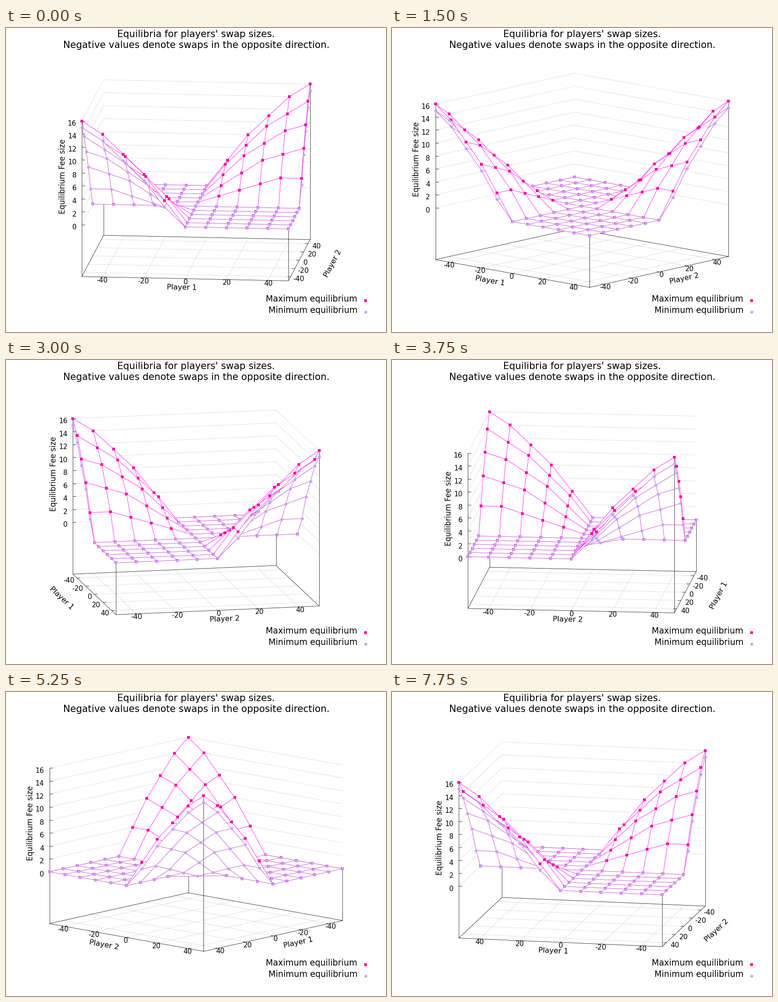
A matplotlib script for the animation above (8000 ms loop, 837x669 px).

```python
import numpy as np
import matplotlib.pyplot as plt
from matplotlib.animation import FuncAnimation
from matplotlib.collections import LineCollection

W, H, DPI = 837, 669, 64
PX = 72 / DPI                      # points per pixel
FRAMES, INTERVAL = 32, 250
START, STEP = 6, 6                 # view angle in degrees
CX, CY = 418.5, 506.3              # centre of the base plane
RADIUS, SQUASH, ZUNIT = 228.7, 0.1995, 14.26
Z_FLOOR, Z_TOP, LIM, N = -8, 16, 50, 11
TICKS = [-40, -20, 0, 20, 40]
Z_TICKS = list(range(0, 17, 2))
HOT, SOFT = "#ff00a0", "#c8a0ff"

plt.rcParams["font.family"] = "DejaVu Sans"

# Fee sizes where both swaps go the same way; zero elsewhere
FEES = np.array([[1, 2, 3, 4, 4],
                 [2, 4, 6, 7, 8],
                 [3, 6, 8, 10, 11],
                 [4, 7, 10, 12, 14],
                 [4, 8, 11, 14, 16]])
upper = np.zeros((N, N))
upper[6:, 6:] = FEES
upper[:5, :5] = FEES[::-1, ::-1]
lower = np.maximum(upper - 1, 0)

axis = np.linspace(-LIM, LIM, N)
gx, gy = np.meshgrid(axis, axis, indexing="ij")
verts = np.concatenate([np.stack([gx, gy, s], -1).reshape(-1, 3)
                        for s in (upper, lower)])
ids = np.arange(N * N).reshape(N, N)
qa, qb = ids[:-1, :-1].ravel(), ids[1:, :-1].ravel()
qc, qd = ids[:-1, 1:].ravel(), ids[1:, 1:].ravel()
tri_near, tri_far = np.stack([qa, qb, qc], 1), np.stack([qd, qc, qb], 1)
one = np.concatenate([tri_near, tri_far])
triangles = np.concatenate([one, one + N * N])
edges = np.concatenate([np.stack([ids[:-1].ravel(), ids[1:].ravel()], 1),
                        np.stack([ids[:, :-1].ravel(), ids[:, 1:].ravel()], 1)])
# Where the surfaces coincide, only the lower one draws its edges
raised = edges[(upper.ravel()[edges] > 0).any(1)]


def project(p, deg):
    """Screen x, screen y and nearness to the viewer."""
    p = np.asarray(p, float)
    c, s = np.cos(np.radians(deg)), np.sin(np.radians(deg))
    x, y, z = p[..., 0] / LIM, p[..., 1] / LIM, p[..., 2]
    near = x * s - y * c
    return np.stack([CX + RADIUS * (x * c + y * s),
                     CY + RADIUS * SQUASH * near - ZUNIT * (z - Z_FLOOR),
                     near], -1)


def visible(pts, tris, tol=1e-6, gap=1e-3):
    order = np.argsort(pts[:, 0])
    x, y, near = pts[order].T
    ok = np.ones(len(x), bool)
    first = np.searchsorted(x, tris[:, :, 0].min(1))
    last = np.searchsorted(x, tris[:, :, 0].max(1), "right")
    for (a, b, c), lo, hi in zip(tris, first, last):
        e, f = b - a, c - a
        det = e[0] * f[1] - e[1] * f[0]
        if lo == hi or abs(det) < 1e-3:
            continue
        dx, dy = x[lo:hi] - a[0], y[lo:hi] - a[1]
        u = (dx * f[1] - dy * f[0]) / det
        w = (e[0] * dy - e[1] * dx) / det
        front = a[2] + u * e[2] + w * f[2] > near[lo:hi] + gap
        ok[lo:hi] &= ~((u > tol) & (w > tol) & (u + w < 1 - tol) & front)
    result = np.empty_like(ok)
    result[order] = ok
    return result


def visible_parts(lines, tris, samples):
    t = np.linspace(0, 1, samples)[:, None]
    pts = lines[:, :1] + (lines[:, 1:] - lines[:, :1]) * t
    shown = visible(pts.reshape(-1, 3), tris).reshape(len(lines), samples)
    parts = []
    for p, v in zip(pts, shown):
        cuts = np.flatnonzero(np.diff(np.concatenate([[0], v, [0]])))
        for s, e in zip(cuts[::2], cuts[1::2]):
            if e - s > 1:
                parts.append(p[[s, e - 1], :2])
    return parts


def turn(tri):
    e, f = tri[:, 1] - tri[:, 0], tri[:, 2] - tri[:, 0]
    return e[:, 0] * f[:, 1] - e[:, 1] * f[:, 0]


def mesh_lines(scr, pairs):
    """Grid edges, plus the diagonals of cells that fold over in this view."""
    bent = turn(scr[tri_near]) * turn(scr[tri_far]) < 0
    diagonals = np.stack([qb, qc], 1)[bent]
    return scr[np.concatenate([pairs, diagonals])]


fig = plt.figure(figsize=(W / DPI, H / DPI), dpi=DPI, facecolor="white")
ax = fig.add_axes([0, 0, 1, 1])
ax.set_xlim(0, W)
ax.set_ylim(H, 0)
ax.axis("off")


def text(x, y, s, size, **kw):
    return ax.text(x, y, s, fontsize=size * PX, color="black", **kw)


def lines(color, width, z, **kw):
    return ax.add_collection(
        LineCollection([], colors=color, linewidths=width * PX, zorder=z, **kw))


def dots(color, marker, size, z):
    return ax.scatter([], [], s=(size * PX) ** 2, c=color, marker=marker,
                      linewidths=0, zorder=z)


text(419, 20.5, "Equilibria for players' swap sizes.", 20.85, ha="center")
text(419, 44.5, "Negative values denote swaps in the opposite direction.", 20.85,
     ha="center")
for y, s, color, marker in ((602, "Maximum equilibrium", HOT, "s"),
                            (627, "Minimum equilibrium", SOFT, "o")):
    text(774, y, s, 18.5, ha="right")
    dots(color, marker, 6.3, 5).set_offsets([[792.5, y - 2]])

grid = lines("#999999", 0.8, 1, linestyles=[(0, (1.2, 2))])
frame = lines("black", 0.75, 2)
meshes = [lines("#ff10ff", 0.85, 3), lines("#bb40c4", 0.85, 4)]
markers = [dots(HOT, "s", 6.2, 5), dots(SOFT, "o", 6.6, 6)]
tick_texts = [[text(0, 0, str(t), 15.3) for t in TICKS] for _ in range(2)]
z_texts = [text(0, 0, str(t), 15.3, ha="right") for t in Z_TICKS]
names = [text(0, 0, s, 16.3, ha="center", va="center", rotation_mode="default")
         for s in ("Player 1", "Player 2")]
z_name = text(0, 0, "Equilibrium Fee size", 16.5, ha="center", va="center",
              rotation=90)


def place_tick(label, value, x, y, ox, oy):
    plus = value >= 0
    if abs(ox) < 0.8:
        ha, dx = "center", 5.2 * ox + (1.5 if plus else -0.2)
    elif ox > 0:
        ha, dx = "left", 9.4 if plus else 5.8
    else:
        ha, dx = "right", -5.3
    label.set_ha(ha)
    label.set_position((x + dx, y + 4.3 + 2 * oy + 5.6))


def place_axis(k, deg, side, out):
    """Ticks, tick labels and name on the near base edge of one axis."""
    def at(v):
        p = [v, side, Z_FLOOR] if k == 0 else [side, v, Z_FLOOR]
        return project(p, deg)[:2]

    ox, oy = out
    segs = []
    for label, value in zip(tick_texts[k], TICKS):
        x, y = at(value)
        segs.append([(x, y), (x - 7 * ox, y - 7 * SQUASH * oy)])
        place_tick(label, value, x, y, ox, oy)
    x, y = at(0)
    dx, dy = at(LIM) - at(-LIM)
    if dx < -1e-6 or (abs(dx) < 1e-6 and dy > 0):
        dx, dy = -dx, -dy
    names[k].set_position((x + 74 * ox, y + 6 + 13.3 * oy))
    names[k].set_rotation(np.degrees(np.arctan2(-dy, dx)))
    return segs


def update(i):
    deg = START + STEP * i
    scr = project(verts, deg)
    tris = scr[triangles]

    for k, pairs in enumerate((raised, edges)):
        part = scr[k * N * N:(k + 1) * N * N]
        meshes[k].set_segments(visible_parts(mesh_lines(part, pairs), tris, 48))
        markers[k].set_offsets(part[visible(part, tris), :2])

    # A tiny turn settles ties when two corners line up
    lean = np.radians(deg + 0.5)
    corners = [(-LIM, -LIM), (LIM, -LIM), (LIM, LIM), (-LIM, LIM)]
    left = min(range(4), key=lambda j: corners[j][0] * np.cos(lean)
               + corners[j][1] * np.sin(lean))
    back = min(range(4), key=lambda j: corners[j][0] * np.sin(lean)
               - corners[j][1] * np.cos(lean))
    right = (left + 2) % 4

    box = []
    for j, (x, y) in enumerate(corners):
        box.append([(x, y, Z_FLOOR), (*corners[(j + 1) % 4], Z_FLOOR)])
        top = Z_TOP if j == left or x == y else 0
        box.append([(x, y, Z_FLOOR), (x, y, top)])
    solid = visible_parts(project(box, deg), tris, 240)

    dotted = [[(*corners[a], z), (*corners[b], z)] for z in Z_TICKS
              for a, b in ((left, back), (back, right))]
    for t in TICKS:
        dotted.append([(t, -LIM, Z_FLOOR), (t, LIM, Z_FLOOR)])
        dotted.append([(-LIM, t, Z_FLOOR), (LIM, t, Z_FLOOR)])
    grid.set_segments(visible_parts(project(dotted, deg), tris, 240))

    c, s = np.cos(np.radians(deg)), np.sin(np.radians(deg))
    ys, xs = -np.sign(np.cos(lean)), np.sign(np.sin(lean))
    solid += place_axis(0, deg, ys * LIM, (ys * s, -ys * c))
    solid += place_axis(1, deg, xs * LIM, (xs * c, xs * s))

    for label, z in zip(z_texts, Z_TICKS):
        x, y = project((*corners[left], z), deg)[:2]
        solid.append([(x, y), (x + 7, y)])
        label.set_position((x - 12, y + 10.2))
    x, y = project((*corners[left], Z_TOP / 2), deg)[:2]
    z_name.set_position((x - 42, y + 7.5))
    frame.set_segments(solid)
    return []


anim = FuncAnimation(fig, update, frames=FRAMES, interval=INTERVAL,
                     repeat=True, repeat_delay=0, blit=False)
plt.show()
```
